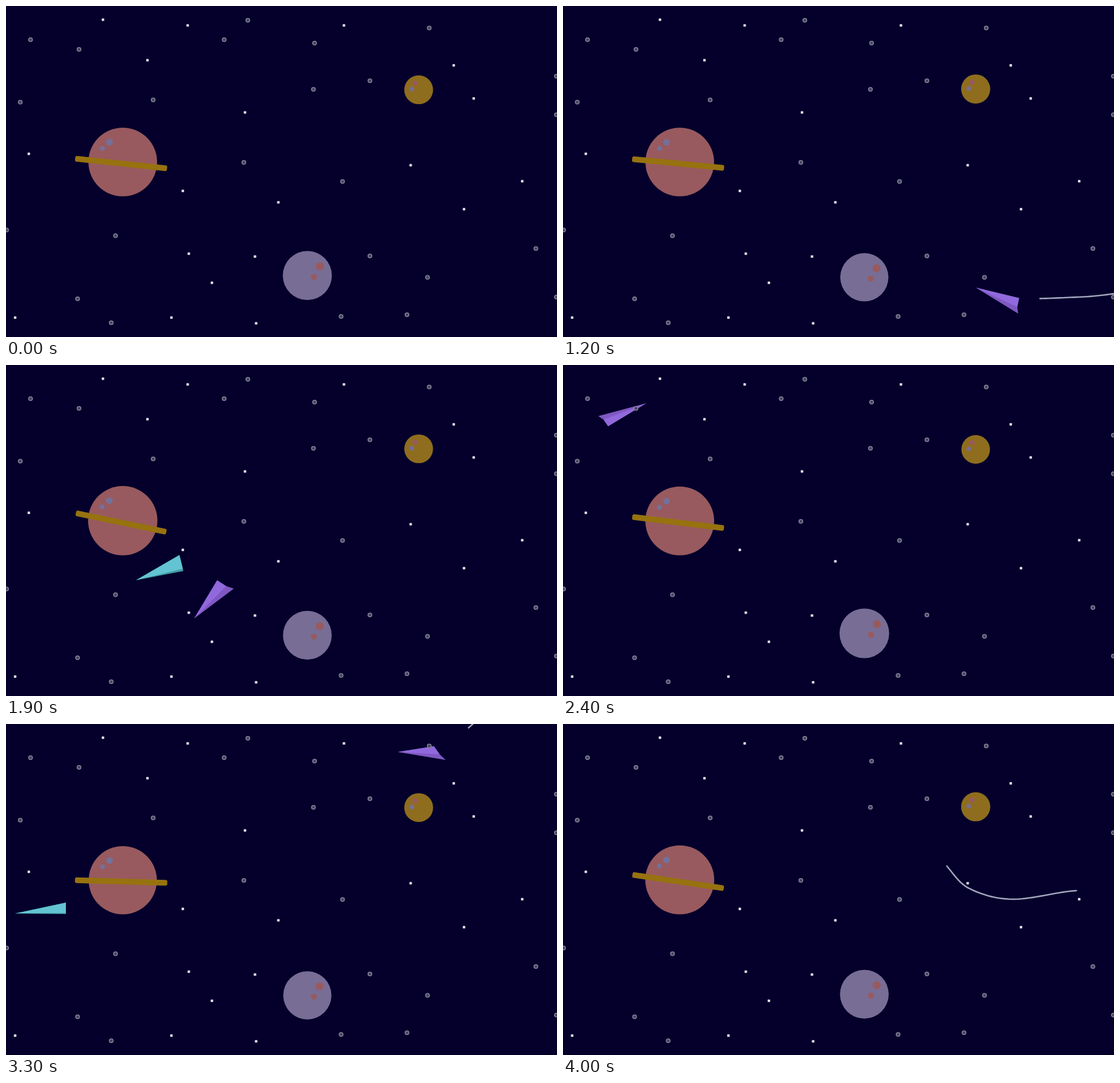
Animation of 966 by 580 pixels, one loop 4.1 s. Source, as an HTML page with a canvas:

```html
<!DOCTYPE html>
<html lang="en">
<head>
<meta charset="utf-8">
<title>Planets and ships</title>
<style>
  html, body { margin: 0; width: 100%; height: 100%; overflow: hidden; background: #04002b; }
  canvas { display: block; }
</style>
</head>
<body>
<canvas id="stage" width="966" height="580"></canvas>
<script>
const ctx = document.getElementById('stage').getContext('2d');
const LOOP = 4100, STEP = 100;
const PINK = '#985a5e', LILAC = '#786d95', GOLD = '#8f6d1e';

const dots = [[170,24],[318.5,34],[248,95],[592.5,34],[785,104],[820,162],[419,186.5],[40,259],
  [310,324],[477.5,344],[709.5,279],[905,307],[803,356],[320.5,434],[436.5,439],[361,485],
  [16,546],[290,546],[438.5,556]];
const rings = [[43,59],[128,76],[382.5,59],[424,25],[541,65],[742,38.5],[638,131],[539,146],[25,168.5],
  [258,164.5],[417,274],[590,307.5],[965,123],[965,190.5],[1,392.5],[192,402.5],[125.5,513],[184.5,555],
  [638,438],[739,475.5],[929,425],[965,510],[587.5,544],[703,541]];

// Ship keys: time, nose x, nose y, directions to the two tail corners (degrees), their distances
const firstFlight = [
  [900,1000,500,-8,10], [1000,905,510,-8,10], [1150,762,508,2,20], [1260,685,467,28,46],
  [1370,625,407,32,50], [1440,555,360,8,26], [1500,475,346,-11,4,64,77], [1600,420,352,-28,-10],
  [1750,375,385,-48,-28], [1900,330,444,-59,-37], [2000,285,492,-45,-25], [2100,205,500,-5,15],
  [2200,105,430,50,70], [2300,70,250,100,118], [2400,146,67,149,165], [2500,240,15,150,166], [2600,330,-40,150,166]];
const secondFlight = [
  [3100,880,-60,-48,-30], [3200,782,28,-25,-6], [3300,687,49,-9,9.5,64,85], [3400,615,75,-25,-5],
  [3500,590,145,-80,-60], [3650,673,249,-137,-117], [3700,710,287,-150,-130], [3780,787,307,-176,-157],
  [3870,900,292,-189,-170], [4000,1030,295,-183,-163,82,79]];
for (const key of [...firstFlight, ...secondFlight]) if (key.length < 7) key.push(78, 87);

// Straight flights: time, nose, velocity per ms, three tail points relative to the nose
const darts = [
  { t: 1500, nose: [587,568], v: [-1.3,1.1], tail: [[57,-67],[66,-48],[60,-36]] },
  { t: 1900, nose: [228,377], v: [-1.8,.4725], tail: [[76,-44],[82,-20],[83,-16]] },
  { t: 3300, nose: [16,332], v: [-1.7,.3], tail: [[89,-19],[89,-1],[89,1]] }];

const mix = (a, b, k) => a + (b - a) * k;

// Triangle wave from 0 at `low` up to 1 after `half` ms
function swing(t, low, half) {
  const p = Math.abs(t - low) / half % 2;
  return p > 1 ? 2 - p : p;
}

// Smooth curve through the keys
function pose(keys, t) {
  const i = Math.min(Math.max(keys.findIndex(k => k[0] > t), 1), keys.length - 1);
  const a = keys[i - 1], b = keys[i], before = keys[i - 2] || a, after = keys[i + 1] || b;
  const span = b[0] - a[0], u = (t - a[0]) / span;
  return a.slice(1).map((_, j) => {
    const n = j + 1;
    const m0 = (b[n] - before[n]) / (b[0] - before[0]) * span;
    const m1 = (after[n] - a[n]) / (after[0] - a[0]) * span;
    return (1 + 2 * u) * (1 - u) ** 2 * a[n] + u * (1 - u) ** 2 * m0
         + u * u * (3 - 2 * u) * b[n] + u * u * (u - 1) * m1;
  });
}

function disc(x, y, r, color) {
  ctx.fillStyle = color;
  ctx.beginPath();
  ctx.arc(x, y, r, 0, 7);
  ctx.fill();
}

function polygon(points, color) {
  ctx.fillStyle = color;
  ctx.beginPath();
  points.forEach(p => ctx.lineTo(...p));
  ctx.fill();
}

function ship([x, y], tail, light, dark) {
  const [a, mid, b] = tail.map(p => [x + p[0], y + p[1]]);
  polygon([[x, y], a, mid, b], dark);
  polygon([[x, y], a, mid], light);
}

function planets(t) {
  const tilt = swing(t, 625, 1250);
  const size = (59.6 + 1.2 * tilt) / 60;
  ctx.save();
  ctx.translate(204.7, 333.6);
  ctx.scale(size, size);
  disc(0, -60, 60, PINK);
  disc(-23.2, -94.6, 5.8, '#75709a');
  disc(-35.5, -84, 4.3, '#75709a');
  ctx.restore();

  ctx.save();
  ctx.translate(201.8, 276);
  ctx.rotate(12 * tilt * Math.PI / 180);
  ctx.fillStyle = '#97720f';
  ctx.beginPath();
  ctx.roundRect(-81, -5, 162, 10, 3);
  ctx.fill();
  ctx.restore();

  const sink = swing(t, 370, 1045), y = 469.8 + 7 * sink, k = (43.6 - 1.7 * sink) / 43;
  disc(528.3, y, 43 * k, LILAC);
  disc(528.3 + 21.8 * k, y - 16 * k, 7 * k, PINK);
  disc(528.3 + 11.5 * k, y + 2.4 * k, 5.3 * k, PINK);

  const drop = swing(t, 940, 1562), gy = 144.9 + 3.2 * drop;
  disc(723.5, gy, 25.6 - .6 * drop, GOLD);
  disc(717.3, gy - 11.7, 4.5, PINK);
  disc(711.5, gy - 1, 4, LILAC);
}

function trail(keys, from, to) {
  ctx.strokeStyle = '#a3a5bd';
  ctx.lineWidth = 2.6;
  ctx.lineCap = 'round';
  ctx.beginPath();
  for (let s = Math.max(from, keys[0][0]); s <= to; s += 5) ctx.lineTo(...pose(keys, s).slice(0, 2));
  ctx.stroke();
}

function flight(keys, t, trailEnd) {
  trail(keys, t - 350, Math.min(t - 130, trailEnd));
  if (t < keys[0][0] || t > keys.at(-1)[0]) return;
  const [x, y, dirA, dirB, lenA, lenB] = pose(keys, t);
  const corner = (deg, len) => [len * Math.cos(deg * Math.PI / 180), len * Math.sin(deg * Math.PI / 180)];
  const a = corner(dirA, lenA), b = corner(dirB, lenB);
  const notch = [0, 1].map(i => mix(a[i], b[i], .6) * .97);
  ship([x, y], [a, notch, b], '#9169dd', '#8058c2');
}

function stars() {
  for (const [x, y] of dots) {
    disc(x, y, 3, '#8f8da255');
    ctx.fillStyle = '#dedde6';
    ctx.fillRect(x - 2, y - 2, 4, 4);
  }
  ctx.strokeStyle = '#85839a';
  ctx.lineWidth = 1.6;
  for (const [x, y] of rings) {
    disc(x, y, 3.3, '#45425f');
    ctx.beginPath();
    ctx.arc(x, y, 3.3, 0, 7);
    ctx.stroke();
  }
}

function draw(now) {
  const t = Math.floor(now % LOOP / STEP) * STEP;
  ctx.fillStyle = '#04002b';
  ctx.fillRect(0, 0, 966, 580);
  planets(t);
  flight(firstFlight, t, 1370);
  flight(secondFlight, t, 4000);
  for (const { t: at, nose, v, tail } of darts) {
    ship(nose.map((n, i) => n + v[i] * (t - at)), tail, '#62c4d2', '#449aa6');
  }
  stars();
}

const start = performance.now();
function frame() {
  draw(performance.now() - start);
  requestAnimationFrame(frame);
}
frame();
</script>
</body>
</html>
```
